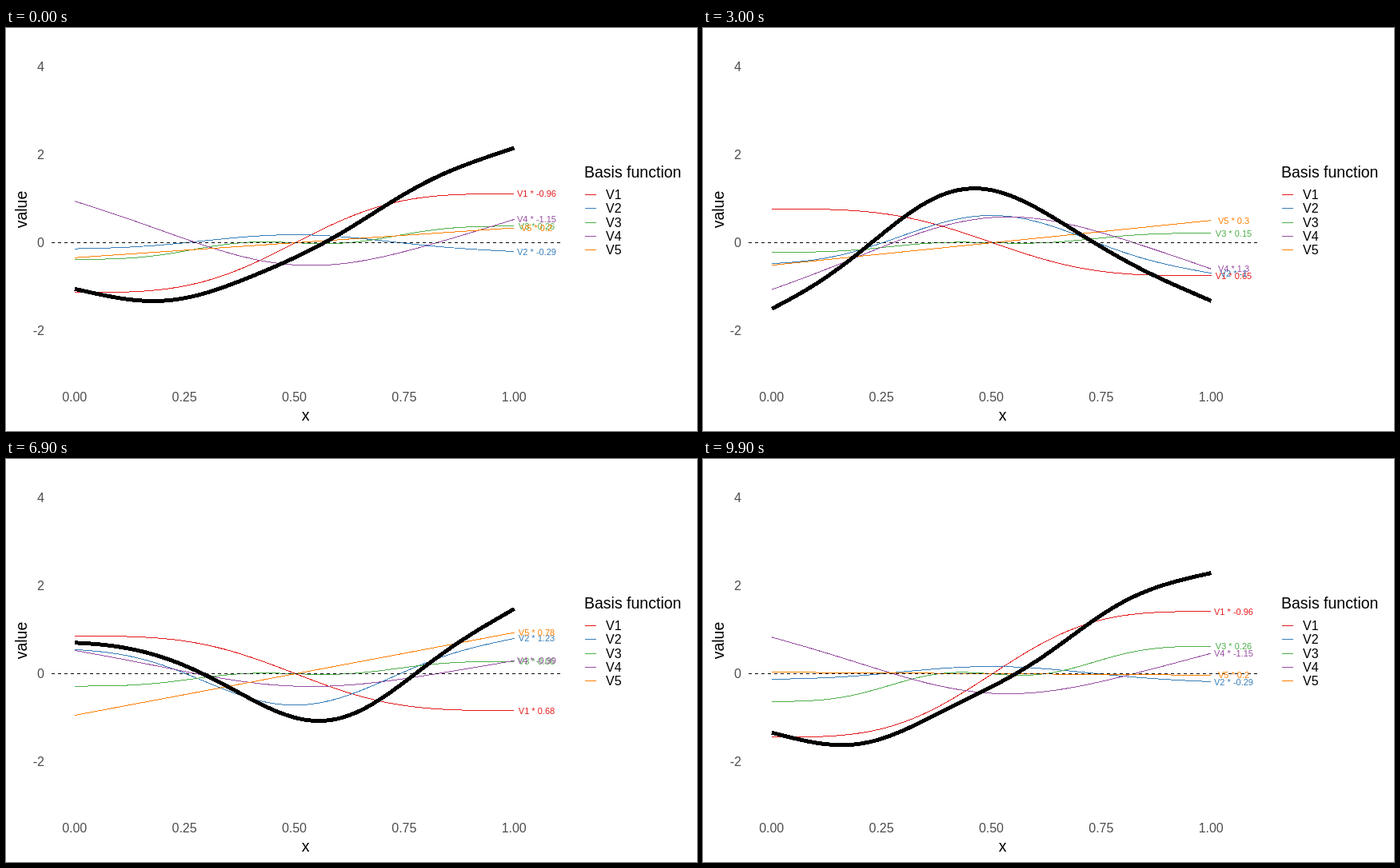
These frames come from a looping animation (864x504 px, 10 s). An HTML page:

```html
<!DOCTYPE html>
<html lang="en">
<head>
<meta charset="utf-8">
<title>Weighted basis functions</title>
<style>
  html, body { margin: 0; width: 100%; height: 100%; overflow: hidden; background: #fff; }
  svg { display: block; font-family: "Liberation Sans", Arial, sans-serif; }
  path { fill: none; shape-rendering: crispEdges; }
  .tick { font-size: 16px; fill: #4d4d4d; }
  .title { font-size: 19.5px; }
  .key { font-size: 16px; }
  .label { font-size: 11px; text-anchor: middle; }
  .mid { text-anchor: middle; }
  .end { text-anchor: end; }
</style>
</head>
<body>
<svg id="stage" width="864" height="504" viewBox="0 0 864 504"></svg>
<script>
const stage = document.getElementById('stage');
const colors = ['#e41a1c', '#377eb8', '#4daf4a', '#984ea3', '#ff7f00'];

// Basis functions of u in [-1, 1]: odd and even harmonics plus a straight line
const s = (n, u) => Math.sin(n * Math.PI * u / 2);
const c = (n, u) => Math.cos(n * Math.PI * u / 2);
const basis = [
  u => .012 - 1.302 * s(1, u) - .131 * s(3, u),
  u => .585 - c(1, u) - .205 * c(3, u) + .11 * u ** 3,
  u => 1.241 * s(1, u) - .355 * s(3, u) - .146 * s(5, u) - .008,
  u => 1.027 * c(1, u) + .053 * c(3, u) + .18 * s(1, u) - .64,
  u => 1.697 * u - .01
];

// Weights of V1..V5, one row per second, printed in the labels
const states = [
  [-.96, -.29, .26, -1.15, .2],
  [-1, .57, 1.1, -.82, .5],
  [-.74, -1.13, -.72, .25, .15],
  [.65, -1, .15, 1.3, .3],
  [-.58, -.94, -.2, -1.67, -.48],
  [-.71, 1.15, 1.01, -.07, -1.14],
  [.9, .85, .73, .74, -.35],
  [.68, 1.23, .06, -.99, .78],
  [.79, -.31, 1.7, -.79, .35],
  [-2.27, -.16, 1.13, -.46, -.9]
];

const SAMPLES = 50, HOLD = 600, STEP = 100, PERIOD = 1000;
const px = x => 86 + 549.5 * x;
const py = v => 268.5 - 55 * v;

function add(tag, attrs, text = '') {
  const el = document.createElementNS('http://www.w3.org/2000/svg', tag);
  for (const name in attrs) el.setAttribute(name, attrs[name]);
  el.textContent = text;
  return stage.appendChild(el);
}

function curvePath(f) {
  let d = '';
  for (let i = 0; i <= SAMPLES; i++) {
    const x = i / SAMPLES;
    d += `${i ? 'L' : 'M'}${px(x).toFixed(2)},${py(f(2 * x - 1)).toFixed(2)}`;
  }
  return d;
}

// Axes and legend
for (let v = -2; v <= 4; v += 2) add('text', { class: 'tick end', x: 48, y: py(v) + 5.5 }, v);
for (let x = 0; x <= 1; x += .25) add('text', { class: 'tick mid', x: px(x) - .3, y: 467 }, x.toFixed(2));
add('text', { class: 'title mid', x: 374.5, y: 491 }, 'x');
add('text', { class: 'title mid', transform: 'translate(26 227) rotate(-90)' }, 'value');
add('text', { class: 'title', x: 723, y: 187 }, 'Basis function');
colors.forEach((stroke, i) => {
  const y = 208.5 + Math.round(17.3 * i);
  add('path', { d: `M724 ${y}H738`, stroke });
  add('text', { class: 'key', x: 750, y: y + 5.5 }, 'V' + (i + 1));
});

const curves = colors.map(stroke => add('path', { stroke }));
add('path', { d: 'M57 268.5H693', stroke: '#000', 'stroke-dasharray': '4 4' });
const total = add('path', { stroke: '#000', 'stroke-width': 5, 'stroke-linejoin': 'round' });
const labels = colors.map(fill => add('text', { class: 'label', x: 663.5, fill }));

function draw(time) {
  const index = Math.floor(time / PERIOD) % states.length;
  const from = states[index], to = states[(index + 1) % states.length];
  const step = Math.floor((time % PERIOD - HOLD) / STEP) + 1;
  const progress = Math.max(0, step) / 5;
  const shown = progress < .5 ? from : to;
  const weights = from.map((w, k) => w + (to[k] - w) * progress);

  basis.forEach((f, k) => {
    curves[k].setAttribute('d', curvePath(u => weights[k] * f(u)));
    labels[k].setAttribute('y', py(weights[k] * f(1)) + 4);
    labels[k].textContent = `V${k + 1} * ${shown[k]}`;
  });
  total.setAttribute('d', curvePath(u => basis.reduce((sum, f, k) => sum + weights[k] * f(u), 0)));
}

const start = performance.now();
function tick() {
  draw(performance.now() - start);
  requestAnimationFrame(tick);
}
tick();
</script>
</body>
</html>
```
